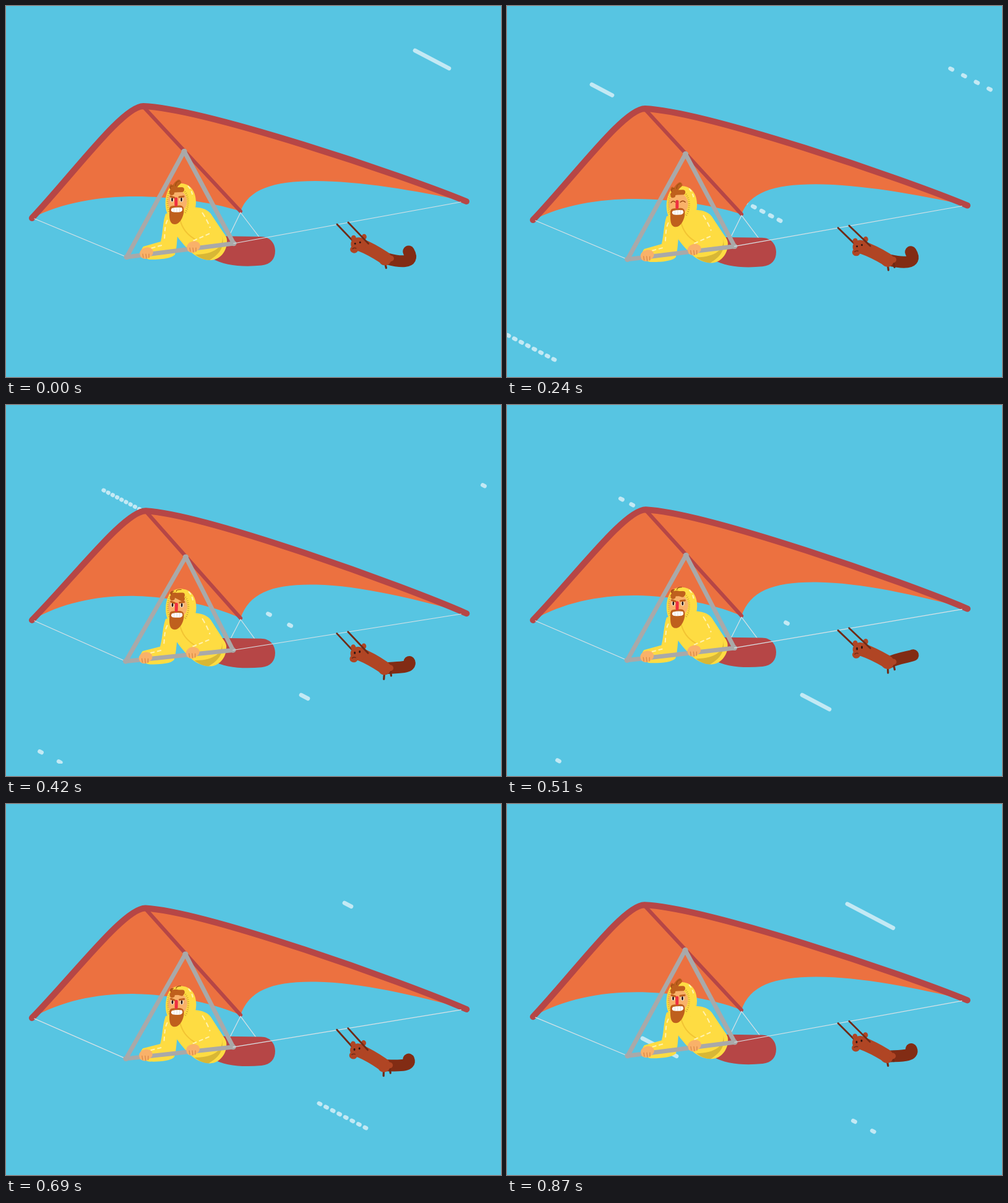
These frames come from a looping animation (800 by 600 pixels, 0.9 s). An HTML page with a canvas:

```html
<!DOCTYPE html>
<html lang="en">
<head>
<meta charset="utf-8">
<title>Hang glider</title>
<style>
  html, body { margin: 0; width: 100%; height: 100%; overflow: hidden; background: #57c5e2; }
  canvas { display: block; }
</style>
</head>
<body>
<canvas id="stage" width="800" height="600"></canvas>
<script>
const ctx = document.getElementById('stage').getContext('2d');
const LOOP = 900, STEP = 30, BOB = 300;
const SKY = '#57c5e2', SAIL = '#ec7140', RED = '#b64646', GREY = '#a9a9a9', WIRE = '#d9e2e6';
const YELLOW = '#fedc42', SHADE = '#d8b735', FOLD = '#f2c433', STITCH = '#fff2b0', SEAM = '#cf9c38';
const SKIN = '#f9b169', KNUCKLE = '#d98643', HAIR = '#bf601d', DARK_HAIR = '#9c4a14';
const FUR = '#b04524', TAIL = '#822c14', LIMB = '#6f2a16', INK = '#2b1512';

// Streaks: start point and the moment each one is partly drawn.
const streaks = [
  [661, 72, 0], [332, 289.6, 60], [-28, 517, 90], [137, 127, 300],
  [477, 469, 540], [547, 160, 810], [219, 379, 870]
];
const SLOPE = 0.525, REACH = 128;

const wave = (t, peak, period = BOB) => Math.cos(2 * Math.PI * (t - peak) / period);
const clamp = v => Math.max(0, Math.min(1, v));
const ease = v => { v = clamp(v); return v * v * (3 - 2 * v); };
const mix = (a, b, k) => a + (b - a) * k;

function fill(path, color) {
  ctx.fillStyle = color;
  ctx.fill(new Path2D(path));
}
function stroke(path, color, width, cap = 'round') {
  ctx.strokeStyle = color;
  ctx.lineWidth = width;
  ctx.lineCap = cap;
  ctx.lineJoin = 'round';
  ctx.stroke(new Path2D(path));
}
function oval(x, y, rx, ry, color, angle = 0) {
  ctx.fillStyle = color;
  ctx.beginPath();
  ctx.ellipse(x, y, rx, ry, angle, 0, 7);
  ctx.fill();
}
function dashed(path, color, width, pattern) {
  ctx.setLineDash(pattern);
  stroke(path, color, width, 'butt');
  ctx.setLineDash([]);
}
function rotateAbout(x, y, angle) {
  ctx.translate(x, y);
  ctx.rotate(angle);
  ctx.translate(-x, -y);
}

function drawStreak(x, y, age) {
  if (age <= -150) return;
  const at = d => `${x + d} ${y + d * SLOPE}`;
  const piece = (a, b) => stroke(`M${at(a)}L${at(b)}`, '#c3e9f4', 6.6);
  const head = Math.min(REACH, 0.367 * (age + 150));
  const tail = Math.max(0, 0.3 * (age - 50));
  if (age < 105) return piece(tail, head);
  const gap = 7.2 + 0.112 * (age - 120);
  const half = Math.min(1.6, (gap - 6) / 4);
  for (let d = tail; d <= head; d += gap) piece(d - half, d + half);
}

function drawSail(lift) {
  const edge = 'M42 343C112 268 189 162 222 162C320 166 640 273 744 316';
  const crest = 283 + lift, left = 308 + lift;
  fill(`${edge}C660 ${298 + lift * 0.5} 570 ${crest} 500 ${crest}` +
    `C430 ${crest} 392 ${297 + lift * 0.8} 379 332` +
    `C330 ${316 + lift * 0.7} 260 ${left} 210 ${left}` +
    `C150 ${left} 90 ${318 + lift * 0.6} 42 343Z`, SAIL);
  stroke('M223 164L379 332', RED, 6);
  stroke(edge, RED, 10);
  stroke('M361 371L379 334L411 376', WIRE, 1.2);
  stroke('M46 344L195 406', WIRE, 1.2);
}

function drawBag(dy) {
  ctx.save();
  ctx.translate(0, dy);
  fill('M335 372L412 373C427 373 435 384 435 396C435 409 428 418 413 419.5C383 422.5 352 420 333 408Z', RED);
  ctx.restore();
}

function drawBody() {
  fill('M258 336C253 350 254 366 250 381L222 389C214 398 222 411 236 410' +
    'C251 410 268 408 273 402C276 392 276 382 277 373C284 383 292 391 297 396' +
    'C306 405 318 411 331 411C345 411 357 397 357 382C358 376 355 371 351 366' +
    'L331 336C324 327 313 326 302 325Z', YELLOW);
  fill('M349 370C354 388 337 402 306 402C314 408 322 411 329 411C347 400 354 388 349 370Z', SHADE);
  stroke('M281 345C285 360 292 369 305 377', FOLD, 2);
  dashed('M317 334C323 343 327 351 330 359', STITCH, 2, [8, 5]);
  dashed('M329 368L302 380', STITCH, 2, [7, 4]);
  dashed('M261 346C256 356 257 366 256 378', STITCH, 2, [7, 5]);
  dashed('M252 387L226 394', STITCH, 2, [7, 4]);
}

function drawHair(flat) {
  const x = mix(282, 287, flat), y = mix(281, 299, flat);
  stroke(`M272 297Q272 ${mix(290, 297, flat)} ${x - 3} ${y + 4}`, HAIR, 8);
  stroke('M268 302C267 297 276 297 284 297', HAIR, 8);
  stroke(`M270 297Q265 294 267 ${mix(291, 294, flat)}`, HAIR, 5);
  stroke(`M274 291Q274 ${mix(284, 288, flat)} ${mix(280, 282, flat)} ${mix(283, 288, flat)}`, DARK_HAIR, 1.2);
  stroke('M266 296Q264 291 270 291', DARK_HAIR, 1.2);
}

function drawHead(flat, blink) {
  fill('M262 298C266 289 276 286 284 287C299 288 307 301 307 317C307 333 299 344 286 348L263 340C256 329 256 310 262 298Z', YELLOW);
  dashed('M294 291C299 296 301 302 302 309', STITCH, 2, [6, 4]);
  oval(277, 316, 15.5, 18, SKIN);
  dashed('M289 300C296 308 296 326 289 335', SEAM, 3, [1, 2.2]);
  dashed('M264 300C260 309 260 324 264 334', SEAM, 3, [1, 2.2]);
  drawHair(flat);
  if (blink) {
    stroke('M265 314Q268 309 272 313', DARK_HAIR, 1.5);
    stroke('M280 313Q284 309 288 313', DARK_HAIR, 1.5);
  } else {
    for (const x of [268.5, 283.5]) {
      oval(x, 313, 2.7, 4, '#fff0d8');
      oval(x, 313, 1.4, 3.2, INK);
    }
    stroke('M266 308L272 310M280 309L287 308', HAIR, 3);
  }
  fill('M264 328C265 322 271 323 275 323C280 322 287 322 287 328C289 335 283 353 273 353C263 353 264 340 264 328Z', HAIR);
  stroke('M274.8 312L274.8 321.5', '#ef2f40', 5, 'round');
  fill('M268 327Q276 325 284 326Q287 331 282 333Q276 334 269 333Q265 331 268 327Z', '#fff');
  stroke('M271.5 327V333M276 326V333M280.5 326V333', '#d9d0c8', 0.7);
}

function drawHand(x, y) {
  oval(x, y, 11, 8.5, SKIN, -0.2);
  oval(x - 2, y + 4, 8, 6, SKIN);
  stroke(`M${x - 6} ${y + 2}l1 6M${x - 1} ${y + 2}l1 7M${x + 4} ${y + 2}l0 6`, KNUCKLE, 1.2);
}

function drawPilot(flat, blink) {
  drawBody();
  drawHead(flat, blink);
  stroke('M195 406L288 235L368 384Z', GREY, 7);
  for (const [x, y] of [[195, 406], [288, 235], [368, 384]]) oval(x, y, 4.6, 4.2, GREY);
  stroke('M368 384L735 317', WIRE, 1.2);
  drawHand(227, 399);
  drawHand(303, 389);
}

function drawSquirrel(curl, legs, stare) {
  const point = (x0, y0, x1, y1) => `${mix(x0, x1, curl)} ${mix(y0, y1, curl)}`;
  const bend = `C${point(630, 396, 634, 413)} ${point(646, 392, 664, 418)} ${point(656, 399, 651, 396)}`;
  stroke(`M616 408${bend}`, TAIL, 19);
  stroke(`M613 414L${mix(615, 612, legs)} ${mix(423, 426, legs)}`, LIMB, 3.2);
  if (legs > 0.05) stroke(`M622 409L624 ${mix(415, 420, ease(legs * 2.5))}`, LIMB, 3.2);
  stroke('M535 353L562 381', LIMB, 2.8);
  stroke('M573 386Q591 393 611 406', FUR, 21);
  oval(613, 408, 10.5, 11, FUR);
  oval(622, 407.5, 5.5, 5, FUR);
  oval(562, 375, 4, 4.5, FUR);
  oval(579, 373, 4, 4.5, FUR);
  oval(570, 385, 12.5, 11, FUR);
  oval(563, 393.5, 6.5, 6, FUR);
  oval(564.5, 384, 1.5, mix(1.5, 2.8, stare), INK);
  oval(572.5, 382, 1.5, mix(1.5, 2.8, stare), INK);
  stroke('M560.5 392.5Q563 390.5 566 391.5', LIMB, 1.5);
  stroke('M553 350L586 384', LIMB, 2.8);
}

function draw(t) {
  const later = t >= 300;
  const tilt = 0.0122 * (wave(0, 287) - wave(t, 287));
  const drop = 3.2 * (wave(0, 15) - wave(t, 15));
  const low = (1 - wave(t, 0)) / 2;
  const lift = -ease((t - 240) / 120) * (6.4 - 1.9 * wave(t, 0));
  const flat = later ? ease(low * 1.2 - 0.1) : 0;
  const blink = t >= 190 && t < 290;
  const curl = (1 - wave(t, 120, 220)) / 2 * (later ? 0.72 : 1);
  const swing = 0.04 * wave(t, 215);
  const poseGlider = () => {
    ctx.translate(0, drop);
    rotateAbout(42, 342, tilt);
  };

  ctx.fillStyle = SKY;
  ctx.fillRect(0, 0, 800, 600);

  ctx.save();
  ctx.beginPath();
  ctx.rect(0, 0, 800, 580);
  ctx.clip();
  for (const [x, y, delay] of streaks) drawStreak(x, y, t - delay);
  ctx.restore();

  ctx.save();
  poseGlider();
  drawSail(lift);
  ctx.restore();

  drawBag(5.2 * low);

  ctx.save();
  poseGlider();
  drawPilot(flat, blink);
  rotateAbout(543, 351, -tilt - swing);
  drawSquirrel(curl, low, 1 - curl);
  ctx.restore();
}

function tick() {
  draw(Math.floor(performance.now() % LOOP / STEP) * STEP);
  requestAnimationFrame(tick);
}
tick();
</script>
</body>
</html>
```
